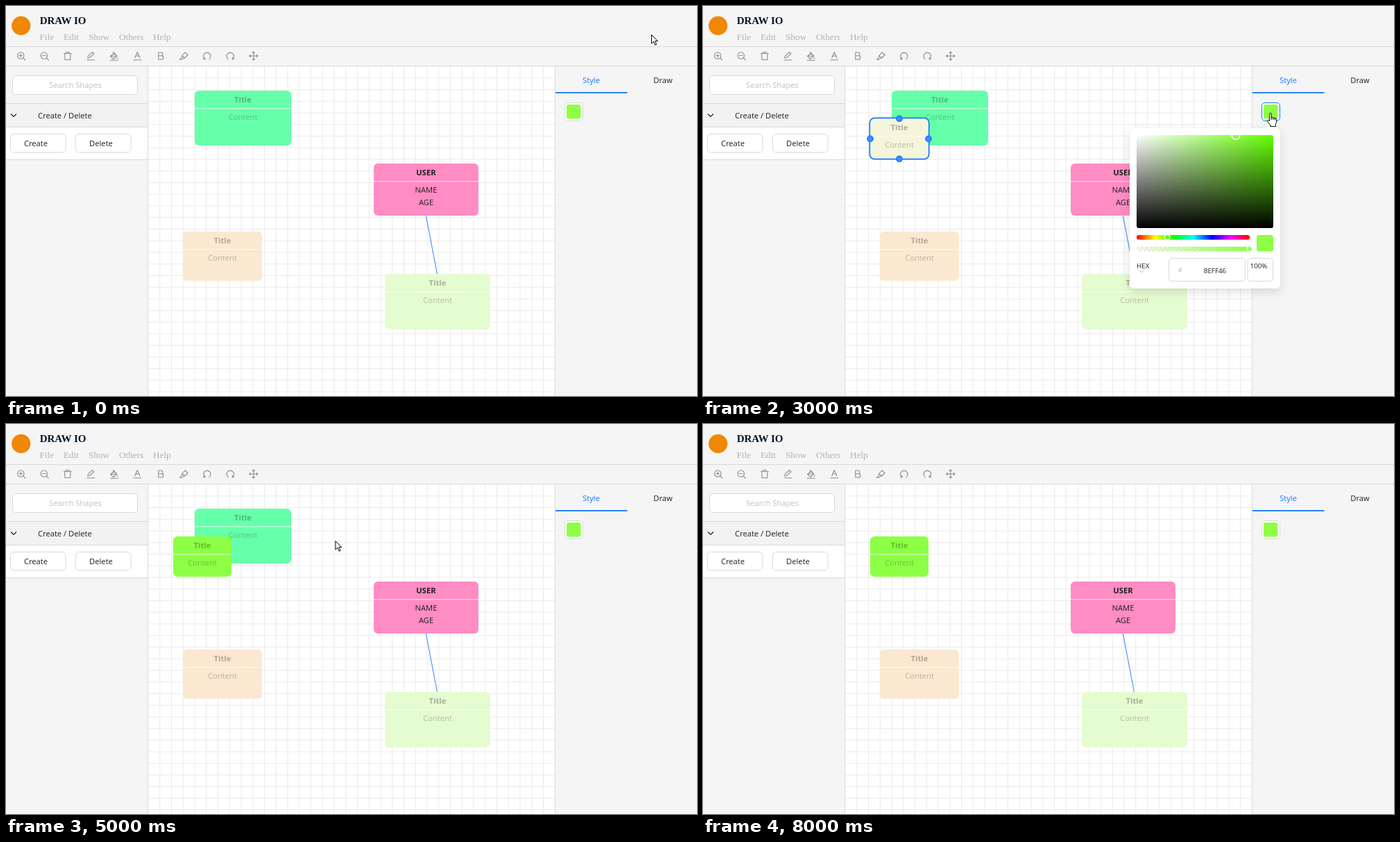
An HTML page for the animation above (8.3 s loop, 996 by 562 pixels).

```html
<!DOCTYPE html>
<html lang="en">
<head>
<meta charset="utf-8">
<title>Diagram editor</title>
<style>
  html, body { margin: 0; width: 100%; height: 100%; overflow: hidden; background: #f5f5f5; }
  svg { display: block; width: 996px; height: 562px; }
  text { font: 11.2px "Open Sans", "Noto Sans", sans-serif; fill: #1f1f1f; }
  .mid { text-anchor: middle; }
  .bold { font-weight: 700; }
  .serif { font: 13.2px "Liberation Serif", "Times New Roman", serif; fill: #b2b2b2; }
  .brand { font-size: 15px; font-weight: 700; fill: #001529; }
  .small { font-size: 9.8px; }
  .icon { fill: none; stroke: #8c8c8c; stroke-width: 1.1; stroke-linecap: round; stroke-linejoin: round; }
</style>
</head>
<body>
<svg id="stage" viewBox="0 0 996 562" xmlns="http://www.w3.org/2000/svg"></svg>
<script>
const LOOP = 8300, BLUE = '#1677ff', LINE = '#d9d9d9', GRID = 16.75;
const stage = document.getElementById('stage');

const rect = (x, y, w, h, fill, extra = '') =>
  `<rect x="${x}" y="${y}" width="${w}" height="${h}" fill="${fill}" ${extra}/>`;
const text = (x, y, str, cls = '', extra = '') =>
  `<text x="${x}" y="${y}" class="${cls}" ${extra}>${str}</text>`;
const path = (d, stroke, extra = '') => `<path d="${d}" fill="none" stroke="${stroke}" ${extra}/>`;
const box = (x, y, w, h, id = '') =>
  rect(x + .5, y + .5, w - 1, h - 1, '#fff', `rx="4.5" stroke="${LINE}" ${id && `id="${id}"`}`);

// Nodes
const nodes = {
  pink: { x: 530, y: 227, w: 151, h: 75, fill: '#ff8cc3', title: 'USER', lines: ['NAME', 'AGE'] },
  beige: { x: 255, y: 325, w: 114, h: 71, fill: '#fbe8d0' },
  lime: { x: 546, y: 386, w: 152, h: 80, fill: '#e5fbd0' },
  big: { x: 272, y: 122, w: 139, h: 79, fill: '#66ffaa' },
  small: { x: 213, y: 96, w: 84, h: 58, fill: '#f5f5dc' }
};

function nodeMarkup([id, { x, y, w, h, fill, title, lines }]) {
  const cx = w / 2;
  const alpha = a => `fill-opacity="${title ? 1 : a}"`;
  const handles = [[cx, 0], [w, h / 2], [cx, h], [0, h / 2]]
    .map(([hx, hy]) => `<circle cx="${hx}" cy="${hy + .4}" r="4"/>`).join('');
  return `<g id="${id}" transform="translate(${x} ${y})">
    ${rect(0, 0, w, h, fill, 'rx="6" class="body"')}
    ${path(`M0 25.8H${w}`, '#fff', 'stroke-opacity=".8"')}
    ${text(cx, 17, title || 'Title', 'mid bold', alpha(.33))}
    ${(lines || ['Content']).map((s, i) => text(cx, 42 + i * 18.4, s, 'mid', alpha(.28))).join('')}
    <g class="marks" stroke="${BLUE}" stroke-width="1.7">
      ${rect(-.7, -.7, w + 1.4, h + 1.4, 'none', 'rx="7" class="outline"')}${handles}
    </g></g>`;
}

// Toolbar icons, drawn around their centres
const lens = 'M4.2 -.5A4.7 4.7 0 1 1 -5.2 -.5A4.7 4.7 0 1 1 4.2 -.5M2.8 2.9L6 6M-2.8 -.5H1.8';
const icons = [
  lens + 'M-.5 -2.8V1.8',
  lens,
  'M-5.5 -3.5H5.5M-2.3 -3.5V-5.5H2.3V-3.5M-4.3 -3.5L-3.7 5.5H3.7L4.3 -3.5',
  'M-5.5 5.7H5.5M-4.5 3L-4 .2L2.3 -5.5L4.7 -3.2L-1.7 2.5Z',
  'M-1.5 -5.5L4 0L-1 4.6L-5.3 .3L.5 -4M-5 .3H3.8M-5.5 6.2H5.5M5 2.2V3.6',
  'M-3.6 2.8L0 -5.5L3.6 2.8M-2.4 0H2.4M-5.5 5.8H5.5',
  'M-3 -5H.8A2.4 2.4 0 0 1 .8 -.2H-3ZM-3 -.2H1.4A2.6 2.6 0 0 1 1.4 5H-3Z',
  'M-5.8 5.2L-3 2L-2.5 -.5L1.8 -5.2L5.8 -1.5L1.3 3L-1.2 3.4L-2.8 5.2ZM-2.5 -.5L1.3 3',
  'M-3 4.6A5.2 5.2 0 1 1 3 4.6M-3 4.6L-5.2 4.4M-3 4.6L-3 2.4',
  'M-3 4.6A5.2 5.2 0 1 1 3 4.6M3 4.6L5.2 4.4M3 4.6L3 2.4',
  'M-6 0H6M0 -6V6M-4.5 -1.5L-6 0L-4.5 1.5M4.5 -1.5L6 0L4.5 1.5M-1.5 -4.5L0 -6L1.5 -4.5M-1.5 4.5L0 6L1.5 4.5'
];
const toolbar = icons.map((d, i) =>
  `<path class="icon" transform="translate(${21.8 + i * 33.5} 72)" d="${d}"/>`).join('');

const menu = [['File', 48.5], ['Edit', 83], ['Show', 119], ['Others', 163], ['Help', 212]]
  .map(([s, x]) => text(x, 49, s, 'serif')).join('');

let grid = '';
for (let x = 205 + GRID; x < 791; x += GRID) grid += `M${x} 87V562`;
for (let y = 87 + GRID; y < 562; y += GRID) grid += `M205 ${y}H791`;

const stops = (colors, opacities = []) => colors.map((c, i) =>
  `<stop offset="${i / (colors.length - 1)}" stop-color="${c}" stop-opacity="${opacities[i] ?? 1}"/>`).join('');

const defs = `<defs>
  <linearGradient id="sat">${stops(['#fff', '#62ff00'])}</linearGradient>
  <linearGradient id="dark" x2="0" y2="1">${stops(['#000', '#000'], [0, 1])}</linearGradient>
  <linearGradient id="hue">${stops(['#f00', '#ff0', '#0f0', '#0ff', '#00f', '#f0f', '#f00'])}</linearGradient>
  <linearGradient id="alpha">${stops(['#8eff46', '#8eff46'], [0, 1])}</linearGradient>
  <pattern id="check" width="6.6" height="6.6" patternUnits="userSpaceOnUse" x="625" y="347">
    ${rect(0, 0, 3.3, 3.3, '#e6e6e6')}${rect(3.3, 3.3, 3.3, 3.3, '#e6e6e6')}</pattern>
  <clipPath id="satClip">${rect(625, 186, 197, 134, '#000', 'rx="3"')}</clipPath>
  <filter id="shadow" x="-20%" y="-20%" width="140%" height="140%">
    <feDropShadow dx="0" dy="5" stdDeviation="7" flood-opacity=".13"/></filter>
</defs>`;

const knob = (x, y, fill) => `<circle cx="${x}" cy="${y}" r="3.8" fill="${fill}" stroke="#fff" stroke-width="1.6"/>`;

const popup = `<g id="popup">
  <g filter="url(#shadow)">${rect(615, 176, 217, 231, '#fff', 'rx="6.5"')}
    <path d="M808 177L816.5 169.8Q818 168.8 819.5 169.8L828 177Z" fill="#fff"/></g>
  <g clip-path="url(#satClip)">
    ${rect(625, 186, 197, 134, 'url(#sat)')}${rect(625, 186, 197, 134, 'url(#dark)')}
    <circle id="marker" cx="768" cy="186.5" r="5.8" fill="none" stroke="#fff" stroke-width="1.7"/></g>
  ${rect(625, 330, 163, 6.7, 'url(#hue)', 'rx="3.3"')}${knob(669, 333.3, '#62ff00')}
  ${rect(625, 346.7, 163, 6.7, 'url(#check)', 'rx="3.3"')}
  ${rect(625, 346.7, 163, 6.7, 'url(#alpha)', 'rx="3.3"')}${knob(788, 350, '#8eff46')}
  ${rect(798, 330, 24, 23.5, '#8eff46', 'rx="3.3"')}
  ${text(625, 378, 'HEX', 'small')}${path('M628.5 380.5L632 384L635.5 380.5', '#bfbfbf')}
  ${box(671, 363, 111, 34)}${text(688, 384, '#', 'mid small', 'fill-opacity=".3"')}
  ${text(738, 384.5, '', 'mid small', 'id="hex"')}
  ${box(784.5, 363, 37.5, 34)}${text(801, 378, '100%', 'mid small')}
</g>`;

const button = (id, x, label) => `<g>
  ${rect(x, 184, 80, 27, 'none', `rx="5" id="${id}Wave" stroke="${BLUE}"`)}
  ${box(x, 184, 80.5, 27.5, id)}${text(x + 37, 202, label, 'mid', `id="${id}Label"`)}</g>`;

const cursors = `<g id="cursor" stroke="#000" stroke-linejoin="round">
  <path id="arrow" fill="#fff" d="M.5 .5V13L3.4 10.2L5.6 15.2L7.6 14.3L5.5 9.5H9.3Z"/>
  <path id="hand" fill="#fff" d="M-1.3 12V1.6Q-1.3 .4 0 .4Q1.3 .4 1.3 1.6V7Q2.6 6 3.8 7.3Q5.2 6.4 6.3 7.8Q8.6 7.3 8.6 9.6V13.5L7.2 16.8V19.6H-.3V17.8L-4.2 12.4Q-5 10.8 -3.7 10.2Q-2.4 10.2 -1.3 12ZM3.8 7.3V10M6.3 7.8V10.5M1.3 7V10"/>
  <path id="beam" fill="none" d="M-2.6 -6.5H-1L0 -5.7L1 -6.5H2.6M0 -5.7V5.7M-2.6 6.5H-1L0 5.7L1 6.5H2.6"/>
</g>`;

stage.innerHTML = defs +
  rect(0, 0, 996, 562, '#f5f5f5') +
  rect(205, 87, 586, 475, '#fff') + path(grid, '#e8e8e8', 'stroke-width=".9"') +
  path('M605.3 302L621.5 386', BLUE, 'stroke-width=".9"') +
  Object.entries(nodes).map(nodeMarkup).join('') +
  '<circle cx="21.7" cy="28.4" r="13.6" fill="#f08705"/>' +
  text(48.7, 26, 'DRAW IO', 'serif brand') + menu + toolbar +
  rect(0, 141, 204, 33, '#f2f2f2') + rect(0, 175, 204, 46, '#fff') +
  path('M0 58.5H996M0 86.5H996M204.5 87V562M791.5 87V562M0 140.5H204M0 174.5H204M0 221.5H204', LINE) +
  box(9, 100, 181, 28) + text(100, 118, 'Search Shapes', 'mid', 'fill-opacity=".28"') +
  path('M7 155.5L11 159.5L15 155.5', '#1f1f1f', 'stroke-width="1.2"') + text(46, 161.5, 'Create / Delete') +
  button('create', 6, 'Create') + button('remove', 100, 'Delete') +
  text(843.5, 110.5, 'Style', 'mid', `style="fill:${BLUE}"`) + text(947, 110.5, 'Draw', 'mid') +
  rect(792, 124, 103.5, 1.8, BLUE) +
  box(805, 139, 27, 27, 'swatch') + rect(808, 142, 20.5, 20.5, '#8eff46', 'rx="3"') +
  popup + cursors;

const $ = id => document.getElementById(id);
const show = (el, on) => el.setAttribute('display', on ? 'inline' : 'none');
const set = (el, attrs) => { for (const k in attrs) el.setAttribute(k, attrs[k]); };

// Pointer stops: time, x, y
const route = [
  [0, 930, 41], [800, 63, 201], [1100, 63, 201], [1600, 255, 124], [2200, 283, 190],
  [2800, 818, 154], [3000, 818, 154], [3500, 771.5, 191], [3800, 770, 188], [4100, 726, 177],
  [4500, 726, 177], [5300, 358, 164], [5500, 328, 174], [6100, 328, 174], [6300, 360, 158],
  [6400, 360, 158], [7000, 137, 196], [7300, 137, 196], [8000, 990, 64], [LOOP, 990, 64]
];
const ease = p => p * p * (3 - 2 * p);

function pointerAt(t) {
  const i = route.findIndex(stop => stop[0] > t);
  const [t0, x0, y0] = route[i - 1], [t1, x1, y1] = route[i];
  const p = ease((t - t0) / (t1 - t0));
  return { x: x0 + (x1 - x0) * p, y: y0 + (y1 - y0) * p };
}

const within = (t, from, to) => t >= from && t < to;
const inside = (p, { x, y, w, h }) => p.x >= x && p.x <= x + w && p.y >= y && p.y <= y + h;

function drawMarks(id, selected, hovered) {
  const marks = $(id).querySelector('.marks');
  show(marks, selected || hovered);
  show(marks.querySelector('.outline'), selected);
  set(marks, { fill: selected ? '#3c91ff' : '#a5cdf2' });
}

function drawButton(id, x, pointer, t, click) {
  const over = inside(pointer, { x, y: 184, w: 80, h: 27 });
  set($(id), { stroke: over ? '#4096ff' : LINE });
  $(id + 'Label').style.fill = over ? '#808080' : '#1f1f1f';
  const p = (t - click) / 400;
  show($(id + 'Wave'), p > 0 && p < 1);
  set($(id + 'Wave'), { 'stroke-width': 8 * Math.min(1, p * 2), 'stroke-opacity': .2 * (1 - p) });
  return over;
}

function render(time) {
  const t = Math.floor(time % LOOP / 100) * 100;
  const pointer = pointerAt(t);
  const exists = { big: t < 7100, small: t >= 1100 };
  const drag = ease(Math.min(1, Math.max(0, (t - 1600) / 600)));
  const small = { ...nodes.small, x: 213 + 28 * drag, y: 96 + 66 * drag };
  const open = within(t, 3000, 4700);

  set($('small'), { transform: `translate(${small.x} ${small.y})` });
  set($('small').querySelector('.body'), { fill: t < 3600 ? nodes.small.fill : '#8dff44' });
  show($('small'), exists.small);
  show($('big'), exists.big);

  const overSmall = exists.small && inside(pointer, small);
  const overBig = exists.big && !overSmall && inside(pointer, nodes.big);
  drawMarks('small', within(t, 1600, 4700) || within(t, 5900, 6500), overSmall);
  drawMarks('big', within(t, 6500, 7100), overBig);
  for (const id of ['pink', 'beige', 'lime']) drawMarks(id, false, false);

  const overCreate = drawButton('create', 6, pointer, t, 1100);
  const overRemove = drawButton('remove', 100, pointer, t, 7000);
  const overSwatch = inside(pointer, { x: 805, y: 139, w: 27, h: 27 });
  set($('swatch'), { stroke: open || overSwatch ? BLUE : LINE });

  show($('popup'), open);
  set($('marker'), { cx: t < 3900 ? 768 : 769.5 });
  $('hex').textContent = t < 3900 ? '8EFF46' : '8DFF44';

  const overColors = open && inside(pointer, { x: 625, y: 186, w: 197, h: 134 });
  const kind = overCreate || overRemove || overSwatch || overColors ? 'hand'
    : overSmall || overBig ? 'beam' : 'arrow';
  for (const name of ['arrow', 'hand', 'beam']) show($(name), name === kind);
  set($('cursor'), { transform: `translate(${pointer.x} ${pointer.y})` });
  show($('cursor'), t < 8000);
}

const start = performance.now();
function tick() {
  render(performance.now() - start);
  requestAnimationFrame(tick);
}
tick();
</script>
</body>
</html>
```
